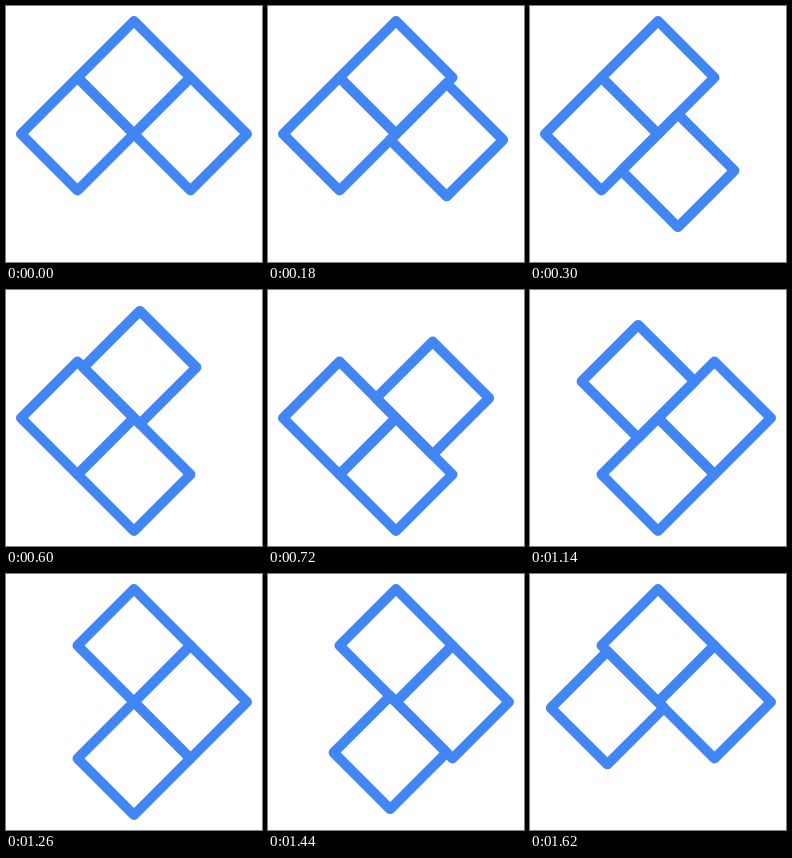
An HTML page for the animation above (1.68 s loop, 256 by 256 pixels).

```html
<!DOCTYPE html>
<html lang="en">
<head>
<meta charset="utf-8">
<title>Sliding squares</title>
<style>
  html, body { margin: 0; height: 100%; overflow: hidden; background: #fff; }
  svg { display: block; width: 100%; height: 100%; }
  rect { fill: none; stroke: #4285f4; stroke-width: 10; stroke-linejoin: round; }
</style>
</head>
<body>
<svg viewBox="0 0 256 256">
  <g transform="translate(128 128) rotate(45)">
    <rect width="79.9" height="79.9"/>
    <rect width="79.9" height="79.9"/>
    <rect width="79.9" height="79.9"/>
  </g>
</svg>
<script>
  const STEP = 60, HOLD = 120, SLIDE = 300, PHASE = HOLD + SLIDE;
  const SIDE = 79.9;
  const slots = [[-1, -1], [0, -1], [0, 0], [-1, 0]]; // clockwise from the top
  const squares = document.querySelectorAll('rect');
  const slot = i => slots[i & 3];

  function place(square, [x, y]) {
    square.setAttribute('x', x * SIDE);
    square.setAttribute('y', y * SIDE);
  }

  function draw(now) {
    const time = Math.floor(now / STEP) * STEP % (4 * PHASE);
    const phase = Math.floor(time / PHASE);
    const p = Math.max(0, (time % PHASE - HOLD) / SLIDE);
    const eased = p * p * (3 - 2 * p);

    // One square slides clockwise into the gap; the gap moves back a slot each phase.
    const from = slot(1 - phase), to = slot(2 - phase);
    place(squares[0], from.map((v, i) => v + (to[i] - v) * eased));
    place(squares[1], slot(-phase));
    place(squares[2], slot(3 - phase));
  }

  const start = performance.now();
  function tick() {
    draw(performance.now() - start);
    requestAnimationFrame(tick);
  }
  tick();
</script>
</body>
</html>
```
